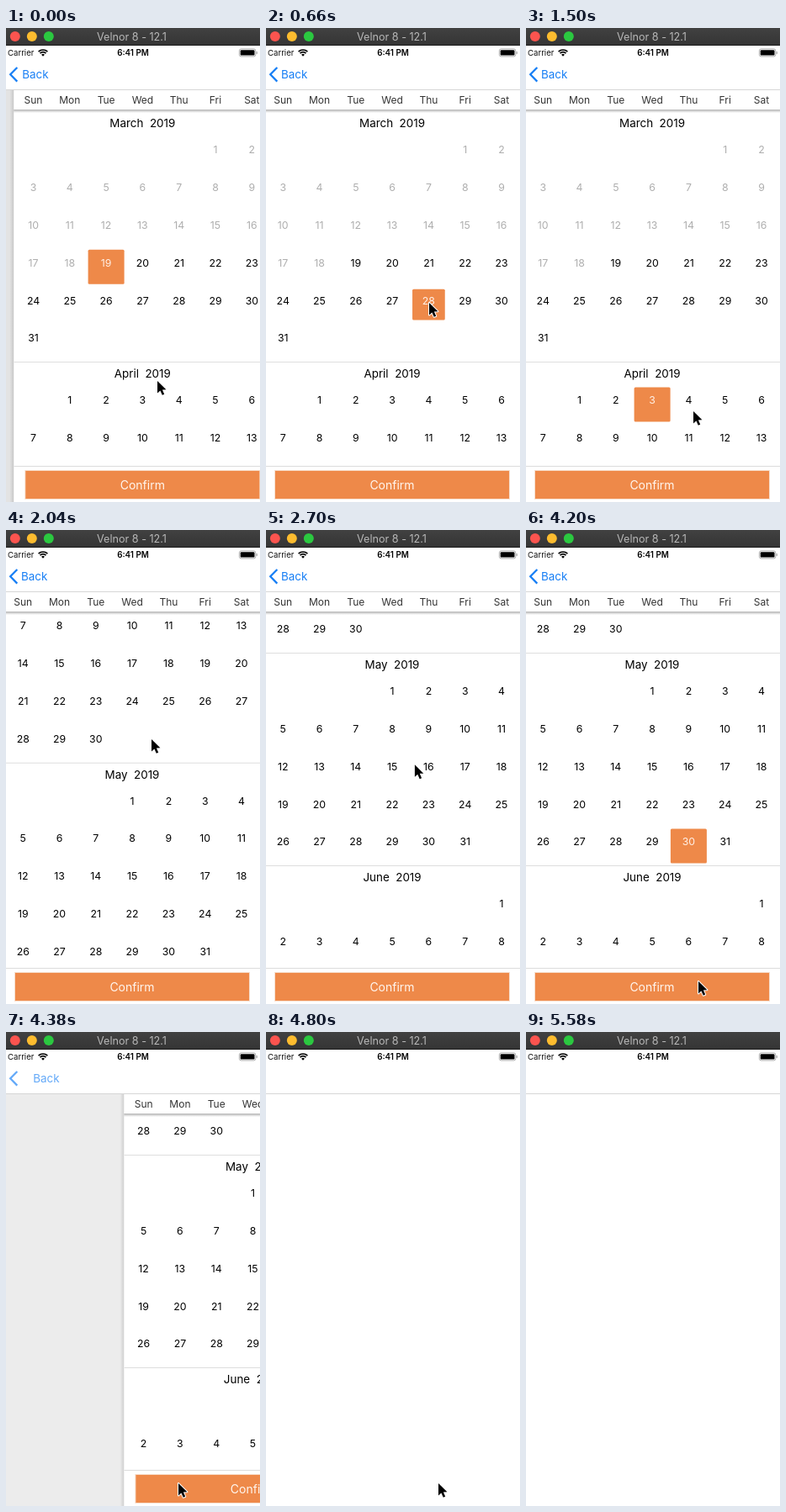
An HTML page with a canvas that plays this animation: 302 px wide and 564 px high, repeating every 5.76 s.

```html
<!DOCTYPE html>
<html lang="en">
<head>
<meta charset="utf-8">
<title>Calendar picker</title>
<style>
html, body { margin: 0; width: 100%; height: 100%; overflow: hidden; background: #fff; }
canvas { display: block; width: 302px; height: 564px; }
</style>
</head>
<body>
<canvas id="stage"></canvas>
<script>
const W = 302, H = 564, LOOP = 5760, STEP = 60;
const PAGE_WIDTH = 303, NAV_BOTTOM = 73, LIST_TOP = 98, LIST_BOTTOM = 521;
const ROW = 44.9, COLUMN = 43.3;
const ORANGE = '#ee8949', BLUE = '#187ff5';

const canvas = document.getElementById('stage');
const ctx = canvas.getContext('2d');
const ratio = window.devicePixelRatio || 1;
canvas.width = W * ratio;
canvas.height = H * ratio;

const months = [
  { name: 'March', first: 5, days: 31 },
  { name: 'April', first: 1, days: 30 },
  { name: 'May', first: 3, days: 31 },
  { name: 'June', first: 6, days: 30 }
];
let monthTop = 99;
for (const month of months) {
  month.top = monthTop;
  monthTop += 29 + ROW * Math.ceil((month.first + month.days) / 7);
}

// Each tap: time, month index, day.
const taps = [[-1000, 0, 19], [570, 0, 28], [1270, 1, 3], [3370, 2, 30]];

// Pointer tip: time, x, y.
const pointerPath = [
  [0, 180, 420], [420, 194, 327], [720, 194, 327], [1230, 150, 446],
  [1330, 150, 446], [1500, 199, 456], [1760, 199, 456], [1980, 173, 249],
  [2400, 173, 249], [3300, 188, 366], [3500, 188, 366], [4180, 205, 537],
  [5300, 205, 537], [5580, 207, 575]
];

const clamp = v => Math.min(1, Math.max(0, v));
const smooth = u => u * u * (3 - 2 * u);
const columnX = i => 20.2 + i * COLUMN;

// Navigation slide: cubic-bezier(.36, .66, .04, 1)
function slideEase(u) {
  if (u <= 0 || u >= 1) return clamp(u);
  const bezier = (s, a, b) => 3 * (1 - s) ** 2 * s * a + 3 * (1 - s) * s * s * b + s ** 3;
  let low = 0, high = 1;
  for (let i = 0; i < 24; i++) {
    const mid = (low + high) / 2;
    if (bezier(mid, .36, .04) < u) low = mid; else high = mid;
  }
  return bezier(low, .66, 1);
}

// 0 = calendar in place, 1 = calendar off to the right
function slideAmount(t) {
  return t < 2000 ? 1 - slideEase((t + 281) / 500) : slideEase((t - 4288) / 500);
}

function scrollOffset(t) {
  return 505 * (1 - (1 - clamp((t - 1770) / 450)) ** 1.475);
}

function pointerAt(t) {
  const next = pointerPath.findIndex(p => p[0] > t);
  if (next < 0) return pointerPath[pointerPath.length - 1].slice(1);
  const a = pointerPath[next - 1], b = pointerPath[next];
  const u = smooth((t - a[0]) / (b[0] - a[0]));
  return [a[1] + (b[1] - a[1]) * u, a[2] + (b[2] - a[2]) * u];
}

function rect(x, y, w, h, color) {
  ctx.fillStyle = color;
  ctx.fillRect(x, y, w, h);
}

function roundRect(x, y, w, h, r) {
  ctx.beginPath();
  ctx.roundRect(x, y, w, h, r);
}

function text(value, x, baseline, size, color, align = 'center', weight = 400) {
  ctx.font = `${weight} ${size}px Inter, sans-serif`;
  ctx.textAlign = align;
  ctx.fillStyle = color;
  ctx.fillText(value, x, baseline);
}

function polyline(points) {
  ctx.beginPath();
  points.forEach(([x, y]) => ctx.lineTo(x, y));
}

function verticalFade(y, h, from, to) {
  const fade = ctx.createLinearGradient(0, y, 0, y + h);
  fade.addColorStop(0, from);
  fade.addColorStop(1, to);
  return fade;
}

function drawWindowBar() {
  rect(0, 0, W, 20, verticalFade(0, 20, '#414141', '#353535'));
  rect(0, 20, W, 1, '#1c1c1c');
  ['#fb544f', '#fdbc2f', '#2bc840'].forEach((color, i) => {
    ctx.fillStyle = color;
    ctx.beginPath();
    ctx.arc(10.8 + i * 20, 10, 6, 0, 7);
    ctx.fill();
  });
  text('Velnor 8 - 12.1', 149.5, 14.7, 12.6, '#b8b8b8');
}

function drawStatusBar() {
  text('Carrier', 2, 33, 9.6, '#111', 'left');
  text('6:41 PM', 151, 33, 9.8, '#000', 'center', 600);

  ctx.strokeStyle = '#000';
  ctx.lineWidth = 1.7;
  for (const radius of [7.6, 4.9]) {
    ctx.beginPath();
    ctx.arc(44, 33.6, radius, -Math.PI * .75, -Math.PI * .25);
    ctx.stroke();
  }
  ctx.fillStyle = '#000';
  ctx.beginPath();
  ctx.moveTo(44, 33.8);
  ctx.arc(44, 33.6, 2.7, -Math.PI * .75, -Math.PI * .25);
  ctx.fill();

  ctx.strokeStyle = '#999';
  ctx.lineWidth = .8;
  roundRect(277.4, 24.9, 19.4, 9, 2.2);
  ctx.stroke();
  ctx.fillStyle = '#000';
  roundRect(278.7, 26.2, 16.8, 6.4, 1.2);
  ctx.fill();
  rect(297.7, 28, 1, 3, '#999');
}

function drawBackButton(slide, opacity) {
  ctx.save();
  ctx.globalAlpha = opacity;
  ctx.strokeStyle = BLUE;
  ctx.lineWidth = 2.3;
  polyline([[13.3, 47], [5.2, 55.3], [13.3, 63.6]]);
  ctx.stroke();
  text('Back', 18 + slide * .1, 60.3, 13.4, BLUE, 'left');
  ctx.restore();
}

function drawMonth(month, index, t, tap) {
  if (index) rect(-3, Math.round(month.top), 310, 1, '#dedede');
  text(`${month.name}  2019`, 150, month.top + 19, 13.4, '#000');
  for (let day = 1; day <= month.days; day++) {
    const cell = month.first + day - 1;
    const x = columnX(cell % 7);
    const y = month.top + 46 + ROW * Math.floor(cell / 7);
    const selected = tap[1] === index && tap[2] === day;
    if (selected) {
      const grow = clamp((t - tap[0]) / 100);
      const w = 43 * grow, h = 41 * grow;
      ctx.fillStyle = ORANGE;
      roundRect(x - w / 2, y + 4.5 - h / 2, w, h, 1.5);
      ctx.fill();
    }
    const past = index === 0 && day < 19;
    text(day, x, y + 3.9, 12.3, selected ? '#fff0e6' : past ? '#aeaeae' : '#000');
  }
}

function drawCalendar(t, slide) {
  ctx.save();
  ctx.beginPath();
  ctx.rect(0, NAV_BOTTOM + 1, W, H);
  ctx.clip();
  ctx.translate(slide, 0);

  if (slide > .5) {
    const shade = ctx.createLinearGradient(-8, 0, -3, 0);
    shade.addColorStop(0, 'rgba(0,0,0,0)');
    shade.addColorStop(1, 'rgba(0,0,0,.12)');
    rect(-8, NAV_BOTTOM, 5, H, shade);
  }
  rect(-3, NAV_BOTTOM, 310, H, '#fff');

  ctx.save();
  ctx.beginPath();
  ctx.rect(-3, LIST_TOP, 310, LIST_BOTTOM - LIST_TOP);
  ctx.clip();
  ctx.translate(0, -scrollOffset(t));
  const tap = taps.filter(entry => entry[0] <= t).pop();
  months.forEach((month, i) => drawMonth(month, i, t, tap));
  ctx.restore();

  rect(-3, 97, 310, 4, verticalFade(97, 4, 'rgba(0,0,0,.3)', 'rgba(0,0,0,0)'));
  ['Sun', 'Mon', 'Tue', 'Wed', 'Thu', 'Fri', 'Sat'].forEach((name, i) =>
    text(name, columnX(i), 90.3, 12, '#333'));

  rect(-3, LIST_BOTTOM, 310, 1, '#dcdcdc');
  rect(10, 526, 280, 35, '#f6dcc9');
  rect(11, 527, 278, 33, ORANGE);
  text('Confirm', 150, 549, 14, '#fff6ef');
  ctx.restore();
}

function drawPointer(t) {
  ctx.save();
  ctx.translate(...pointerAt(t));
  polyline([[0, 0], [0, 14.5], [3.4, 11.4], [5.8, 16.8], [8.2, 15.8], [5.9, 10.5], [10.4, 10.3]]);
  ctx.closePath();
  ctx.lineJoin = 'round';
  ctx.strokeStyle = '#fff';
  ctx.lineWidth = 2;
  ctx.stroke();
  ctx.fillStyle = '#000';
  ctx.fill();
  ctx.restore();
}

function draw(t) {
  ctx.setTransform(ratio, 0, 0, ratio, 0, 0);
  rect(0, 0, W, H, '#fff');
  const amount = slideAmount(t), slide = amount * PAGE_WIDTH;
  const presence = 1 - amount ** 1.5;

  rect(0, NAV_BOTTOM, W, H, `rgba(0,0,0,${.11 * presence})`);
  if (amount < 1) {
    drawCalendar(t, slide);
    drawBackButton(slide, presence);
  }
  rect(0, NAV_BOTTOM, W, 1, '#d6d6d6');
  drawStatusBar();
  drawWindowBar();
  drawPointer(t);
}

const start = performance.now();
function tick() {
  const t = (performance.now() - start) % LOOP;
  draw(Math.floor(t / STEP) * STEP);
  requestAnimationFrame(tick);
}
tick();
</script>
</body>
</html>
```
